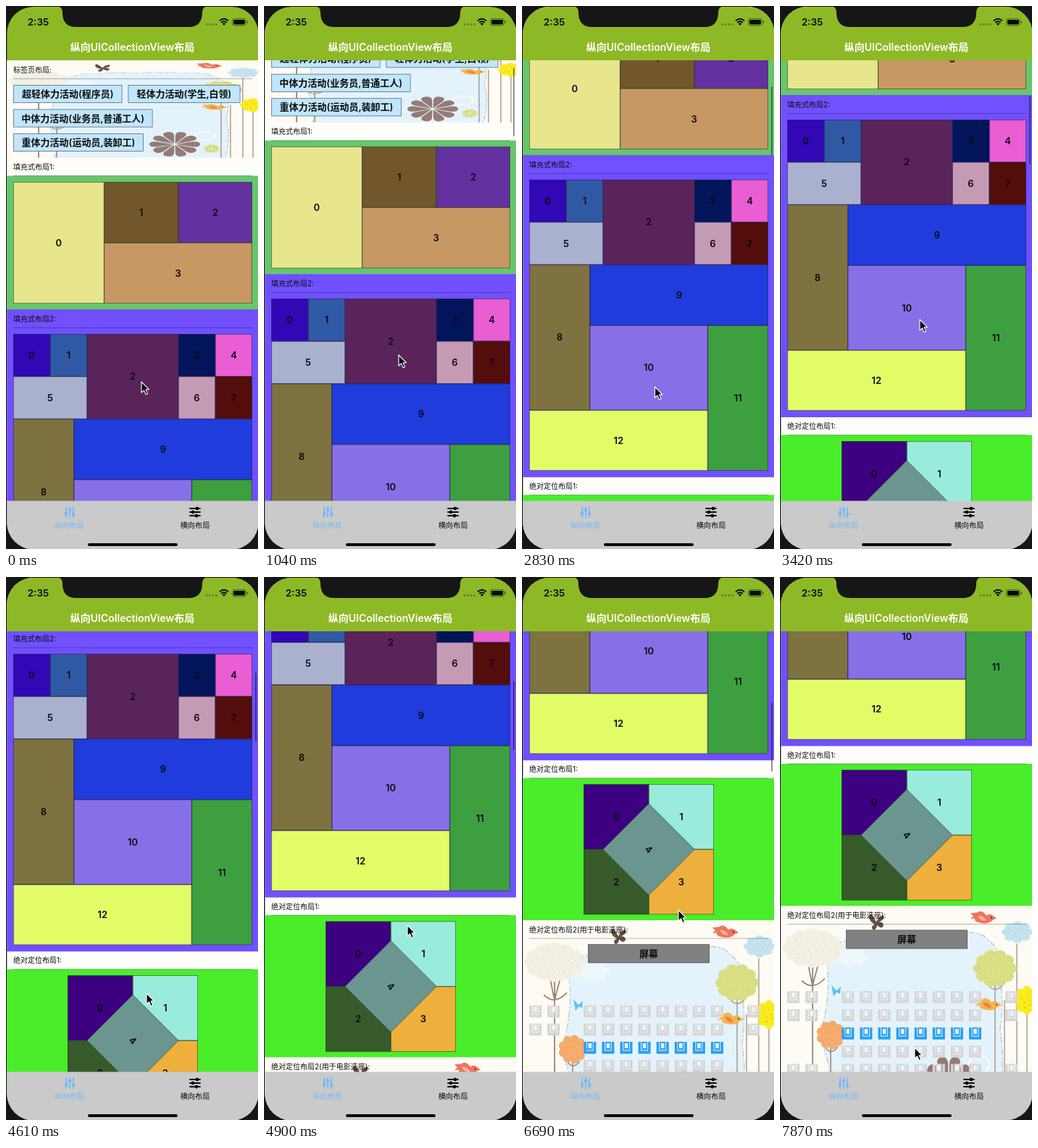
An HTML page for the animation above (8 s loop, 348 by 750 pixels).

```html
<!DOCTYPE html>
<html lang="zh-CN">
<head>
<meta charset="utf-8">
<title>Collection layout</title>
<style>
html, body { margin: 0; width: 100%; height: 100%; overflow: hidden; background: #161616; }
svg { display: block; width: 100%; height: 100%; }
text { font-family: Inter, "Noto Sans CJK SC", "Noto Sans CJK", sans-serif; }
</style>
</head>
<body>
<svg id="stage" viewBox="0 0 348 750"></svg>
<script>
const LOOP = 8000, STEP = 148.3;

const rect = (x, y, w, h, fill, extra = '') =>
  `<rect x="${x}" y="${y}" width="${w}" height="${h}" fill="${fill}" ${extra}/>`;
const line = (d, stroke, w = 1, extra = '') =>
  `<path d="${d}" fill="none" stroke="${stroke}" stroke-width="${w}" ${extra}/>`;
const shape = (d, fill) => `<path d="${d}" fill="${fill}"/>`;
const oval = (x, y, rx, ry, fill, extra = '') =>
  `<ellipse cx="${x}" cy="${y}" rx="${rx}" ry="${ry}" fill="${fill}" ${extra}/>`;
const text = (s, x, y, size, { anchor = 'middle', weight = 400, fill = '#0b0b0b', extra = '' } = {}) =>
  `<text x="${x}" y="${y + size * .36}" font-size="${size}" text-anchor="${anchor}" font-weight="${weight}" fill="${fill}" ${extra}>${s}</text>`;
const move = (x, y, body) => `<g transform="translate(${x} ${y})">${body}</g>`;

// Box whose border lies inside its edges
const box = (x, y, w, h, fill) =>
  rect(x + .3, y + .3, w - .6, h - .6, fill, 'stroke="#15151c" stroke-opacity=".75" stroke-width=".6"');

// Cell given by its edges, with a number in the middle
const cell = (n, x0, y0, x1, y1, fill) =>
  box(x0, y0, x1 - x0, y1 - y0, fill) +
  text(n, (x0 + x1) / 2, (y0 + y1) / 2, 13, { weight: 600 });

const header = (s, y) =>
  text(s, 10, y + 13, 10, { anchor: 'start' }) +
  line(`M10 ${y + 25}H340`, '#000', .7, 'opacity=".4"');

const tag = (s, x, y, w) =>
  rect(x + .4, y + .4, w - .8, 24.2, '#c0e6fd', 'stroke="#5c6b78" stroke-width=".8"') +
  text(s, x + w / 2, y + 12.5, 13, { weight: 600 });

// Crown with a scalloped edge
function crown(x, y, rx, ry, fill, lobes = 9) {
  let out = oval(x, y, rx * .85, ry * .85, fill);
  for (let i = 0; i < lobes; i++) {
    const a = i / lobes * 2 * Math.PI;
    out += oval(x + rx * .7 * Math.cos(a), y + ry * .7 * Math.sin(a), rx * .3, ry * .3, fill);
  }
  return out;
}

function flower(x, y, rx, ry, fill, petals) {
  let out = '';
  for (let i = 0; i < petals; i++)
    out += `<g transform="rotate(${i * 360 / petals})">` +
      shape('M.06 0L.7 -.2Q1 -.24 1 0Q1 .24 .7 .2Z', fill) + '</g>';
  return `<g transform="translate(${x} ${y}) scale(${rx} ${ry})">${out}</g>`;
}

function specks(x, y, rx, ry, fill, n) {
  let out = '';
  for (let i = 0; i < n; i++) {
    const a = i * 2.4, r = Math.sqrt((i + .5) / n);
    out += oval((x + rx * r * Math.cos(a)).toFixed(1), (y + ry * r * Math.sin(a)).toFixed(1), 1.1, 1.1, fill);
  }
  return out;
}

const bird = (x, y, body, wing) => move(x, y,
  shape('M-18 -7L-9 -8Q-2 -13 4 -4Q9 -8 14 -3L18 0L13 2Q7 9 -5 6Q-13 5 -12 0L-18 1L-14 -3Z', body) +
  shape('M-8 -4Q0 -4 4 3Q-4 5 -8 -4', wing) + oval(11, -1, 1, 1, '#222'));

function scenery() {
  const sky = 'M66 285Q74 250 66 215Q54 180 62 150Q70 110 64 72Q72 50 92 48Q104 36 124 40Q150 32 178 38Q214 31 246 38Q278 32 288 48Q306 58 302 90Q310 130 304 170Q311 220 303 285Z';
  const trunk = '#9b8579';
  return rect(0, 0, 348, 285, '#fdfbf3') +
    shape(sky, '#e4f2fb') +
    line(sky, '#b4cad9', 1.3, 'stroke-dasharray="9 3 3 2"') +
    crown(98, 70, 24, 14, '#eef7fc', 7) + oval(275, 219, 14, 13, 'none', 'stroke="#fff" stroke-width="2"') +
    line('M45 78V285M39 80Q42 97 45 110M53 80Q48 98 45 110M30 103Q45 118 62 100', trunk, 1.8) +
    crown(45, 58, 42, 27, '#f2f0e4', 12) + specks(45, 58, 34, 21, '#e8e4d5', 45) +
    line('M297 108V285M287 108Q296 122 309 108M310 130V285M327 52V285M341 145V285', trunk, 1.2) +
    crown(328, 36, 22, 15, '#c5e3ef', 8) + specks(328, 36, 15, 9, '#b4d7e6', 15) +
    crown(297, 86, 30, 26, '#d8de82', 10) + specks(297, 86, 22, 18, '#e4e8a0', 30) +
    crown(341, 130, 18, 20, '#f9ec1d', 8) + specks(341, 130, 10, 11, '#d8c41a', 7) +
    line('M70 195V285M62 194Q70 208 80 194', trunk, 1.5) +
    crown(70, 178, 20, 20, '#f5aa68', 9) + specks(70, 178, 14, 14, '#f8bd88', 18) +
    bird(281, 17, '#ee7460', '#f8b49f') + bird(288, 137, '#f3b54c', '#ee7b4d') +
    move(133, 21, shape('M0 1Q-8 -14 -10 -7Q-10 1 -2 4Q-9 8 -4 12Q1 11 1 5Q7 12 10 6Q10 1 4 1Q13 -3 10 -8Q4 -8 0 1', '#665047')) +
    shape('M71 109L78 117L84 111L83 121L78 119L74 125Z', '#63bdf2') +
    flower(233, 244, 35, 37, '#947b75', 10) + flower(284, 257, 11, 12, '#d5dc76', 10);
}

// Arms and base around a back rest with a light cushion
const seat = (x, y, fill) => move(x, y,
  shape('M-8.5 -8H-5V4.5H5V-8H8.5V8.5H-8.5Z', fill) +
  rect(-4, -8, 8, 11.5, fill) + rect(-2.3, -6, 4.6, 7, '#eef5f9'));

function seats() {
  let out = '';
  for (let row = 0; row < 5; row++)
    for (let col = 0; col < 13; col++) {
      const middle = col > 2 && col < 11;
      const side = col < 2 || col === 12;
      if (middle || side && row !== 2 && row !== 3)
        out += seat(18.5 + col * 25.1, 1210.5 + row * 25.1, row === 2 ? '#25a0f6' : '#d6d6d6');
    }
  return out;
}

function content() {
  return rect(0, 75, 348, 1300, '#fdfdfa') +
    `<g transform="translate(0 75) scale(1 .475)">${scenery()}</g>` +
    rect(0, 209.5, 348, 25, '#fdfdfa') +
    header('标签页布局:', 75.5) +
    tag('超轻体力活动(程序员)', 10, 109, 150.5) +
    tag('轻体力活动(学生,白领)', 168.5, 109, 155) +
    tag('中体力活动(业务员,普通工人)', 10, 142.5, 192.5) +
    tag('重体力活动(运动员,装卸工)', 10, 176, 180) +

    rect(0, 234.5, 348, 185, '#67c66b') +
    header('填充式布局1:', 209.5) +
    cell(0, 10, 243, 135.5, 411, '#e7e68d') +
    cell(1, 135.5, 243, 238, 327, '#72572c') +
    cell(2, 238, 243, 340, 327, '#6331a0') +
    cell(3, 135.5, 327, 340, 411, '#c89864') +

    rect(0, 419, 348, 445, '#7050ff') +
    header('填充式布局2:', 419.5) +
    cell(0, 10, 453, 61, 511.7, '#3107b6') +
    cell(1, 61, 453, 112, 511.7, '#3059a5') +
    cell(2, 112, 453, 238, 570.4, '#5a245b') +
    cell(3, 238, 453, 289, 511.7, '#02155a') +
    cell(4, 289, 453, 340, 511.7, '#e95ed2') +
    cell(5, 10, 511.7, 112, 570.4, '#a9b1ce') +
    cell(6, 238, 511.7, 289, 570.4, '#c59bb4') +
    cell(7, 289, 511.7, 340, 570.4, '#530d0b') +
    cell(8, 10, 570.4, 93.7, 771.5, '#7e7240') +
    cell(9, 93.7, 570.4, 340, 654.3, '#203cdc') +
    cell(10, 93.7, 654.3, 256.5, 771.5, '#8770e7') +
    cell(11, 256.5, 654.3, 340, 855, '#3e9f40') +
    cell(12, 10, 771.5, 256.5, 855, '#e1fc67') +

    rect(0, 888.5, 348, 196.5, '#4aed2a') +
    header('绝对定位布局1:', 863.5) +
    cell(0, 85, 897, 175, 987, '#3d0080') +
    cell(1, 175, 897, 265, 987, '#99ecdc') +
    cell(2, 85, 987, 175, 1077, '#375a2b') +
    cell(3, 175, 987, 265, 1077, '#eeb03c') +
    `<g transform="rotate(45 175 987)">${cell(4, 130, 942, 220, 1032, '#6a968f')}</g>` +

    move(0, 1085, scenery()) +
    header('绝对定位布局2(用于电影选座):', 1085) +
    box(91, 1118, 168, 26, '#808080') +
    text('屏幕', 175, 1131, 13, { weight: 600 }) +
    seats();
}

function sliders(color) {
  const knobs = [[-5, 3], [0, -3], [5, 2]];
  return knobs.map(([y, x]) =>
    line(`M-7 ${y}H7`, color, 1.8, 'stroke-linecap="round"') +
    rect(x - 2, y - 2.2, 4, 4.4, color, 'rx="1.2"')).join('');
}

function chrome() {
  const blue = '#74b9f6';
  return rect(0, 0, 348, 75, '#8eb926') +
    shape('M70 0Q78 1 78 9V11Q79 29 97 29H252Q270 29 271 11V9Q271 1 279 0Z', '#161616') +
    text('2:35', 44.5, 22, 13.5, { weight: 600 }) +
    [277, 281.5, 286, 290.5].map(x => oval(x, 25.5, 1.4, 1.4, '#647f25')).join('') +
    line('M295 20.5Q301 15 307 20.5M297.3 23Q301 19.5 304.7 23', '#0b0b0b', 1.9) +
    shape('M298.7 24.3Q301 22.6 303.3 24.3L301 27Z', '#0b0b0b') +
    rect(312.5, 17.5, 19, 9.5, 'none', 'rx="2.6" stroke="#4b621a" stroke-width="1"') +
    rect(314, 19, 16, 6.5, '#0b0b0b', 'rx="1.4"') + rect(332.7, 20.6, 1.4, 3.4, '#4b621a', 'rx=".7"') +
    text('纵向UICollectionView布局', 174.5, 57, 14, { weight: 600, fill: '#fff' }) +
    rect(0, 683.5, 348, 67, '#cacaca') +
    `<g transform="translate(88 699) rotate(90)">${sliders(blue)}</g>` +
    move(261, 699, sliders('#0b0b0b')) +
    text('纵向布局', 87.5, 717, 10.2, { fill: blue }) +
    text('横向布局', 261, 717, 10.2) +
    rect(113, 742, 124, 4, '#0b0b0b', 'rx="2"');
}

document.getElementById('stage').innerHTML =
  `<clipPath id="screen"><rect x="1.3" y="1" width="347" height="749.5" rx="37"/></clipPath>
  ${rect(0, 0, 348, 750, '#161616')}
  <g clip-path="url(#screen)">
    <g id="page">${content()}</g>
    ${rect(344, 0, 2, 95, '#000', 'id="bar" rx="1" opacity=".42"')}
    ${chrome()}
  </g>
  <path id="cursor" d="M0 0V15L3.5 11.8L6 17.6L8.6 16.4L6.1 10.8H10.6Z" fill="#080808" stroke="#fff" stroke-width="1.1" stroke-linejoin="round"/>`;

const [page, bar, cursor] = ['page', 'bar', 'cursor'].map(id => document.getElementById(id));

// Drags: first step, last step, distance, ease-out power, step at which the bar hides
const drags = [
  [5, 12, 137.5, 1.3, 14],
  [17, 23, 158.5, 1.6, 26],
  [30, 35, 157, 1.75, 38],
  [41, 47, 177.5, 2, 49]
];

// Pointer: step, x, y
const path = [
  [0, 187, 519], [1, 175, 552], [2, 177, 559], [3, 177, 559], [4, 179, 559], [5, 179, 559],
  [7, 186, 482], [10, 188, 416], [14, 188, 416], [16, 175, 600], [17, 175, 600],
  [21, 192, 452], [23, 193, 433], [26, 193, 433], [28, 192, 622], [30, 192, 622],
  [33, 198, 481], [35, 199, 450], [38, 199, 450], [40, 190, 640], [41, 190, 640],
  [45, 216, 460], [49, 197, 469], [51, 183, 635], [52, 183, 662], [53, 186, 650]
];

function pointer(k) {
  const i = path.findIndex(p => p[0] >= k);
  if (i < 0) return path[path.length - 1].slice(1);
  if (i === 0) return path[0].slice(1);
  const [a, b] = [path[i - 1], path[i]];
  const u = (k - a[0]) / (b[0] - a[0]);
  return [1, 2].map(j => a[j] + (b[j] - a[j]) * u);
}

function draw(ms) {
  const k = Math.floor(ms % LOOP / STEP);
  let scroll = 0, shown = false;
  for (const [from, to, dist, power, hide] of drags) {
    const u = Math.min(1, Math.max(0, (k - from) / (to - from)));
    scroll += dist * (1 - (1 - u) ** power);
    shown = shown || k > from && k < hide;
  }
  page.setAttribute('transform', `translate(0 ${-scroll.toFixed(2)})`);
  bar.setAttribute('y', 77.5 + scroll * .157);
  bar.setAttribute('visibility', shown ? 'visible' : 'hidden');
  cursor.setAttribute('transform', `translate(${pointer(k).join(' ')})`);
}

const start = performance.now();
function tick() {
  draw(performance.now() - start);
  requestAnimationFrame(tick);
}
tick();
</script>
</body>
</html>
```
